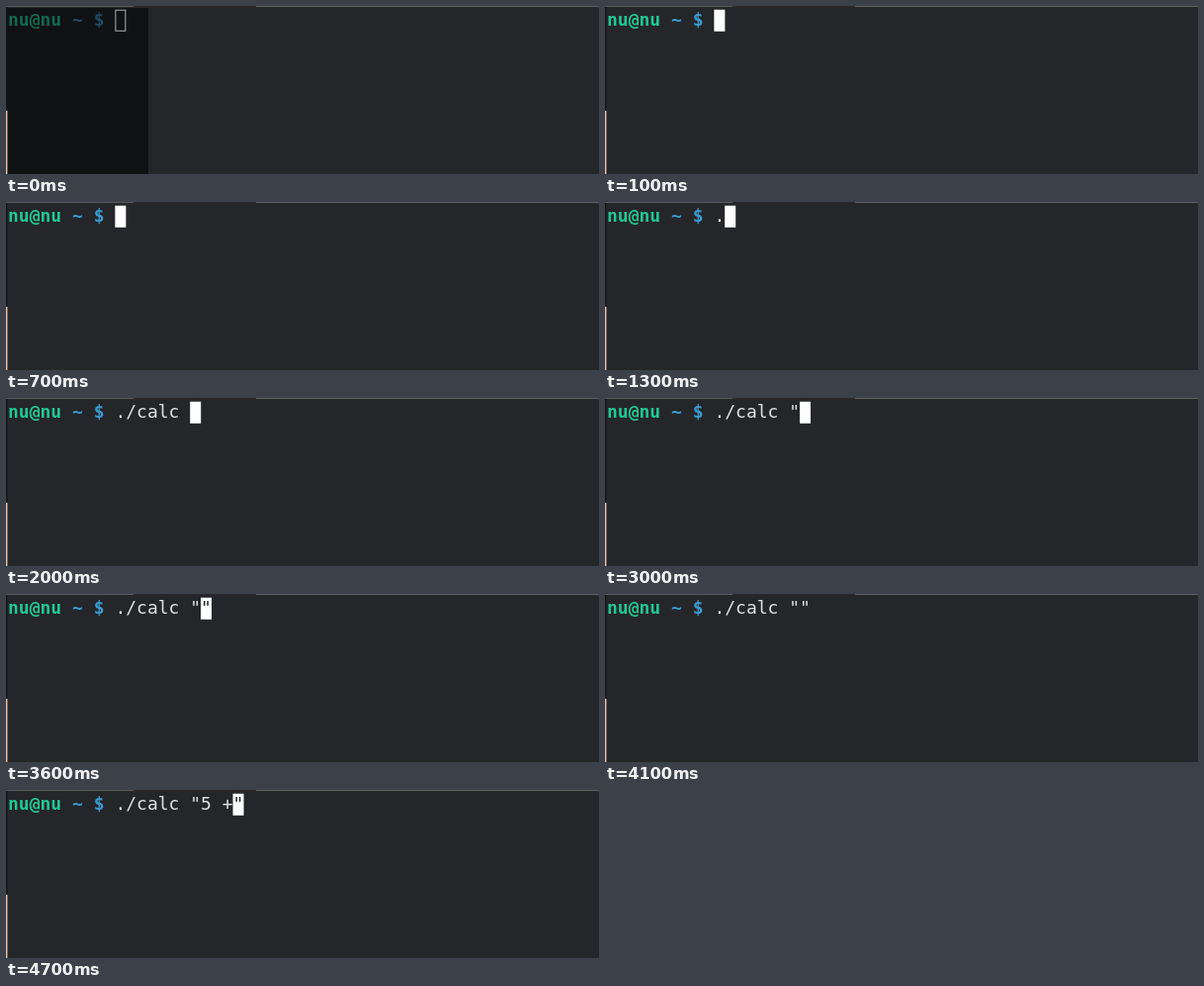
An HTML page that plays this animation: 600 px wide and 170 px high, repeating every 5000 ms.

```html
<!DOCTYPE html>
<html lang="en">
<head>
<meta charset="utf-8">
<title>Terminal typing</title>
<style>
  html, body { margin: 0; width: 100%; height: 100%; overflow: hidden; background: #242629; }
  #stage { position: relative; width: 600px; height: 170px; overflow: hidden; background: #242629; }
  #stage > * { position: absolute; }
  .top { left: 0; top: 0; width: 600px; height: 1px;
    background: linear-gradient(90deg, #59595c 129px, #2b252b 129px 253px, #626265 253px); }
  .edge { left: 0; top: 1px; width: 2px; height: 169px;
    background: linear-gradient(#121316 105px, #efc4ae 105px);
    mask-image: linear-gradient(90deg, #000 1px, #0006 1px); }
  #shade { left: 1px; top: 2px; width: 143px; height: 168px; background: #101113; }
  #line, #cursor { filter: blur(.4px); }
  #line { left: 2px; top: 3px; margin: 0; font: 18px/21px "DejaVu Sans Mono", monospace; color: #dfe0e0; }
  #line b { color: #22c891; }
  #line b + b { color: #3a9cd2; }
  .dim #line b { color: #12694c; }
  .dim #line b + b { color: #1d4a66; }
  #cursor { left: 0; top: 0; width: 11px; height: 22px; box-sizing: border-box; background: #fff; }
  .dim #cursor { background: none; border: 1px solid #b0b1b2; }
  #under { color: #242629; }
</style>
</head>
<body>
<div id="stage">
  <div id="shade"></div>
  <div class="top"></div>
  <div class="edge"></div>
  <div id="cursor"></div>
  <pre id="line"><b>nu@nu</b> <b>~ $</b> <span id="before"></span><span id="under"></span><span id="after"></span></pre>
</div>
<script>
const LOOP = 5000, CELL = 10.836, ORIGIN = 2, CURSOR_TOP = 3.7, PROMPT = 10;
const FOCUS_AT = 100;
const HIDDEN = -1;

// [start ms, command, cursor column in the command]
const steps = [
  [0, '', 0],
  [1100, '', HIDDEN],
  [1300, '.', 1],
  [1400, './c', 3],
  [1500, './ca', 4],
  [2000, './calc ', 7],
  [2600, './calc ', HIDDEN],
  [3000, './calc "', 8],
  [3100, './calc ""', 9],
  [3600, './calc ""', 8],
  [4100, './calc ""', HIDDEN],
  [4200, './calc "5"', 9],
  [4500, './calc "5 "', 10],
  [4700, './calc "5 +"', 11]
];

const [stage, shade, cursor, before, under, after] =
  ['stage', 'shade', 'cursor', 'before', 'under', 'after'].map(id => document.getElementById(id));

function render(time) {
  const [, command, column] = steps.findLast(([start]) => start <= time);
  const unfocused = time < FOCUS_AT;
  const split = column === HIDDEN ? command.length : column;
  const x = ORIGIN + (PROMPT + split) * CELL;

  stage.classList.toggle('dim', unfocused);
  shade.hidden = !unfocused;
  cursor.hidden = column === HIDDEN;
  cursor.style.transform = `translate(${x}px, ${CURSOR_TOP}px)`;
  before.textContent = command.slice(0, split);
  under.textContent = command.slice(split, split + 1);
  after.textContent = command.slice(split + 1);
}

const begin = performance.now();
function tick() {
  render((performance.now() - begin) % LOOP);
  requestAnimationFrame(tick);
}
tick();
</script>
</body>
</html>
```
